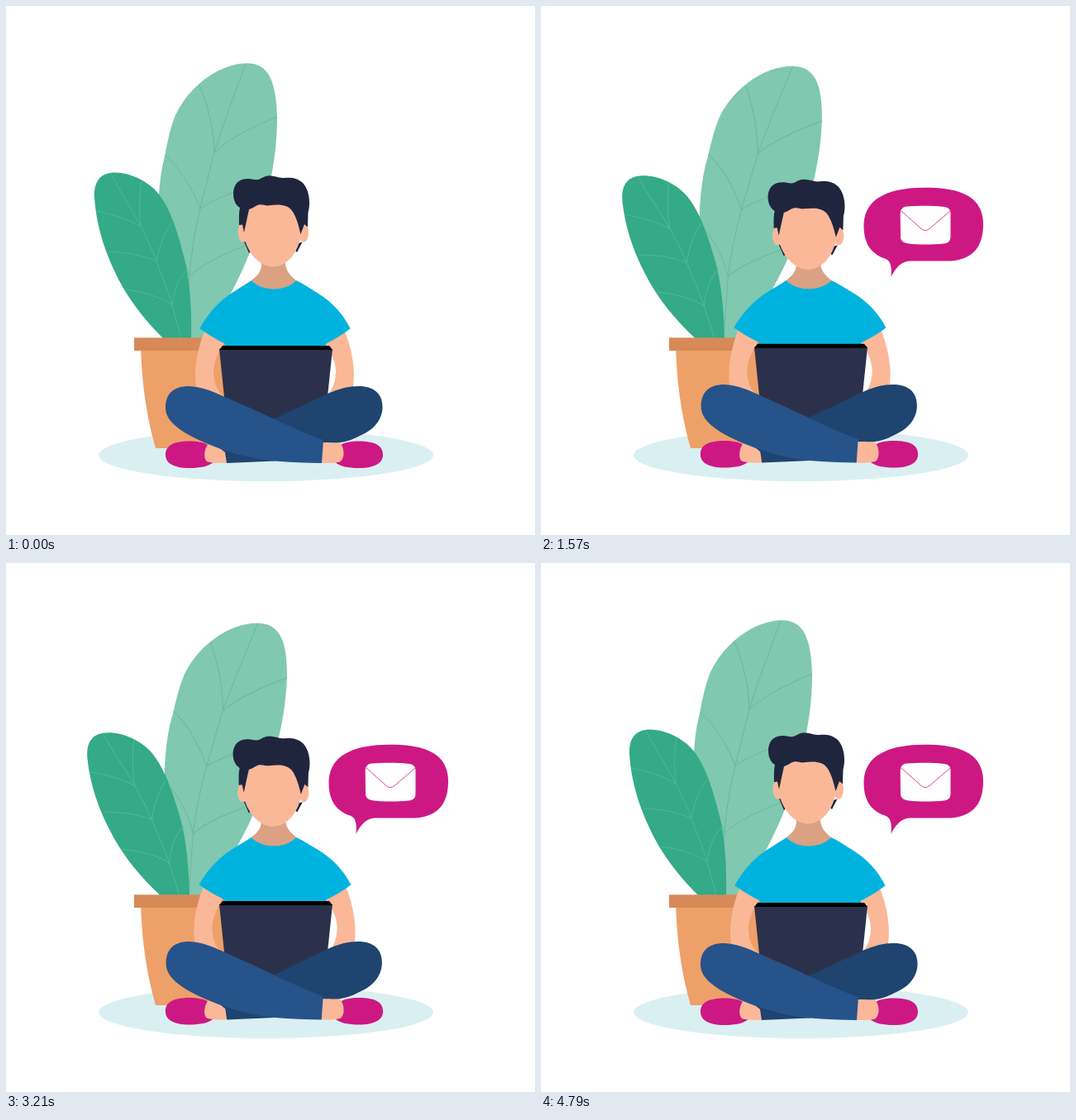
Animation, 640 px wide and 640 px high, one loop 4.87 s. Source, as an HTML page:

```html
<!DOCTYPE html>
<html lang="en">
<head>
<meta charset="utf-8">
<title>Mail on the laptop</title>
<style>
html, body { margin: 0; width: 100%; height: 100%; overflow: hidden; background: #fff; }
svg { display: block; width: 100vw; height: 100vh; }
.vein { fill: none; stroke-width: 1; }
.skin { fill: #fab898; }
.hair { fill: #20253e; }
.pink { fill: #cd1884; }
</style>
</head>
<body>
<svg viewBox="0 0 640 640">
  <defs>
    <path id="armShape" d="M243 386C231 414 227 440 230 460L240 482H267L264 472C257 469 251 456 251 443C251 431 256 420 264 408L262 396Z"/>
    <path id="shoeShape" d="M193 543C193 531 204 526.5 222 526.5C232 526.5 240 528 244 531L242 545L251 552C244 557 236 559 222 559C203 559 193 553 193 543Z"/>
  </defs>

  <ellipse cx="314.5" cy="543.5" rx="202.3" ry="31.5" fill="#daeff1"/>

  <g id="bigLeaf">
    <path fill="#80c8b0" d="M291 69.3C318 69 327 92 328 134C328 180 320 222 301 282C290 312 275 350 238 402L222 425L212 425L205 402C184 330 178 232 192 182C196 160 200 144 205 132C222 96 258 70 291 69.3Z"/>
    <path class="vein" stroke="#68ba9d" d="M290 70C277 105 262 145 252 177C245 205 240 225 235 245C228 275 224 300 222 327L219 410M234 95C246 125 251 150 252 177C270 160 300 146 328 134M192 180C210 195 225 220 235 245C255 231 290 220 315 210M190 270C206 286 216 306 222 327C240 310 265 300 296 287"/>
  </g>
  <g id="smallLeaf">
    <path fill="#34aa88" d="M133 201.5C115 201 106 211 107 232C109 263 118 292 130 318C145 352 168 380 190 402L210 425H223L224 402C225 365 222 330 216 306C208 275 200 248 186 229C174 213 152 202 133 201.5Z"/>
    <path class="vein" stroke="#52b797" d="M127 203C138 225 152 245 163 267C170 281 177 294 182 309C190 330 196 345 201 362C206 380 210 393 214 412M164 211C161 230 161 250 163 267C148 258 130 252 109 248M201 262C191 275 185 292 182 309C165 301 145 298 124 297M220 318C208 330 203 345 201 362C187 352 168 346 145 343"/>
  </g>

  <path fill="#eea069" d="M163 410C164 455 170 497 181 535H268C279 497 285 455 286 410Z"/>
  <rect x="155" y="401.3" width="139" height="15.7" fill="#d78a58"/>

  <use id="armL" href="#armShape" class="skin"/>
  <use id="armR" href="#armShape" class="skin"/>

  <g id="torso">
    <path fill="#dba183" d="M309 305V312C309 322 304 326 297 332L300 348H348L351 332C344 326 339 321 338 312V305Z"/>
    <path fill="#00b3df" d="M297 332C310 346 338 346 351 332C360 336 368 342 375 346C395 358 408 373 416.5 390.3Q403 401 387 408.5L388 424H264L265 408.5Q249 401 234.3 390.3C243 374 256 358 275 346C282 341 290 337 297 332Z"/>
  </g>

  <g id="head">
    <path class="hair" d="M288 285L294 299L304 290ZM358.5 285.5L352 298L344 290Z"/>
    <ellipse class="skin" cx="286.5" cy="274" rx="6" ry="11.7"/>
    <ellipse class="skin" cx="360" cy="274" rx="6" ry="11.7"/>
    <path class="skin" d="M287 270C288 296 306 315.5 323 315.5C341 315.5 358 294 357 268L347 236H298Z"/>
    <path class="hair" d="M283 244C281.5 251 282 258 282 265L286 264.5L288 274L294 246C298 245 300 243 303 241.5C309 238.5 313 242 318 241.3C330 240 341 239.5 347 249C352 257 354 266 356.5 276L361 264L365 267.5L365.5 250C369 237 366.5 222 359 214C351 206.5 342 207.5 336 208C328 208.5 322 203.5 314 206C308 208 307 211 301 210C294 209 288 207.5 281 212.5C272.5 219 273 238 283 244Z"/>
  </g>

  <g id="laptop">
    <path fill="#2c314b" d="M258 415L271 540H382L395 415Z"/>
    <path fill="#000" d="M262 411H391L395 416H258Z"/>
  </g>

  <g id="feet">
    <use href="#shoeShape" class="pink"/>
    <use href="#shoeShape" class="pink" transform="matrix(-1 0 0 1 649 0)"/>
    <path class="skin" d="M245 529C239 537 239 548 243 551C247 553 258 553 269 553V538L255 526ZM380 522C390 527 398 528 404 528C410 535 410 548 404 551.5C398 553.5 390 553 380 553Z"/>
  </g>
  <g id="legs">
    <path fill="#1e446f" d="M427 460C400 460 385 472 323 500L250 528L265 540L267 553L325 550.5L384 528C392 528 398 528.5 404 528C414 527 422 523 430 519C446 512 455 500 455.5 486C456 470 446 460 427 460Z"/>
    <path fill="#26538a" d="M193 486C193 468 204 460 221 460C240 460 260 471 290 484C330 502 360 517 384 525L382 553C363 553 343 552 325 550.5C290 548 245 533 216 516C202 507 193 498 193 486Z"/>
  </g>

  <g id="bubble">
    <path class="pink" d="M463 219.7C505 219.5 535 229 535 264C535 294 520 308.5 490 308.5H446C436 308.5 428 318 423.5 328C424.5 318 424 308 416 305.5C400 300 390.5 288 390.5 266C390.5 233 420 220 463 219.7Z"/>
    <path fill="#fff" d="M443 242.5C455 241.3 478 241.3 488 243C494 244 495.5 247 495.5 251V279C495.5 285 492 287 487 287.5C475 288.8 455 288.8 445 287.5C438 286.5 435 284 435 279L434.7 252C435 246 437 243 443 242.5Z"/>
    <path fill="none" stroke="#cd1884" stroke-width=".8" d="M436 248L460 269.5Q465 273.5 470 269.5L495 248"/>
  </g>
</svg>
<script>
const LOOP = 4870, SWAY = 4786;
const el = id => document.getElementById(id);
const parts = {};
for (const id of ['bigLeaf', 'smallLeaf', 'armL', 'armR', 'torso', 'head', 'laptop', 'feet', 'legs', 'bubble'])
  parts[id] = el(id);

const put = (id, value) => parts[id].setAttribute('transform', value);
const ramp = (t, a, b) => Math.min(1, Math.max(0, (t - a) / (b - a)));
const wave = u => (1 - Math.cos(Math.PI * u)) / 2;

// cubic-bezier(x1, 0, x2, 1)
function bezier(u, x1, x2) {
  if (u <= 0 || u >= 1) return u <= 0 ? 0 : 1;
  let lo = 0, hi = 1, p = 0.5;
  for (let i = 0; i < 24; i++) {
    p = (lo + hi) / 2;
    const q = 1 - p;
    if (3 * q * q * p * x1 + 3 * q * p * p * x2 + p * p * p < u) lo = p; else hi = p;
  }
  return p * p * (3 - 2 * p);
}

// scale by (sx, sy) around (x, y), then shift down by dy
const scaleAt = (x, y, sx, sy, dy = 0) =>
  `translate(${x} ${y + dy}) scale(${sx} ${sy}) translate(${-x} ${-y})`;

function draw(t) {
  const sway = wave(2 * Math.min(1, t / SWAY));
  put('bigLeaf', `rotate(${3.05 * sway} 212 440)`);
  put('smallLeaf', `rotate(${-3 * sway} 225 455)`);

  const k = wave(ramp(t, 1010, 2150)) - wave(ramp(t, 2600, 3780));
  put('head', scaleAt(321, 315.5, 1 + 0.02 * k, 1 - 0.018 * k, 7 * k));
  put('torso', scaleAt(325.4, 332, 1 + 0.02 * k, 1 - 0.034 * k));
  const shift = `translate(${-3.5 * k} ${-1.5 * k})`;
  put('armL', shift);
  put('armR', 'matrix(-1 0 0 1 650 0) ' + shift);
  put('laptop', `translate(0 ${-4.5 * k})`);
  put('feet', scaleAt(324.5, 553, 1 + 0.002 * k, 1, -0.8 * k));
  put('legs', scaleAt(324.5, 553, 1 - 0.01 * k, 1 + 0.032 * k, -k));

  const size = bezier(t / 1285, 0.64, 0.21);
  parts.bubble.style.display = size > 0.002 ? '' : 'none';
  put('bubble', scaleAt(423.5, 328, size, size));
}

const start = performance.now();
function tick() {
  draw((performance.now() - start) % LOOP);
  requestAnimationFrame(tick);
}
draw(0);
requestAnimationFrame(tick);
</script>
</body>
</html>
```
